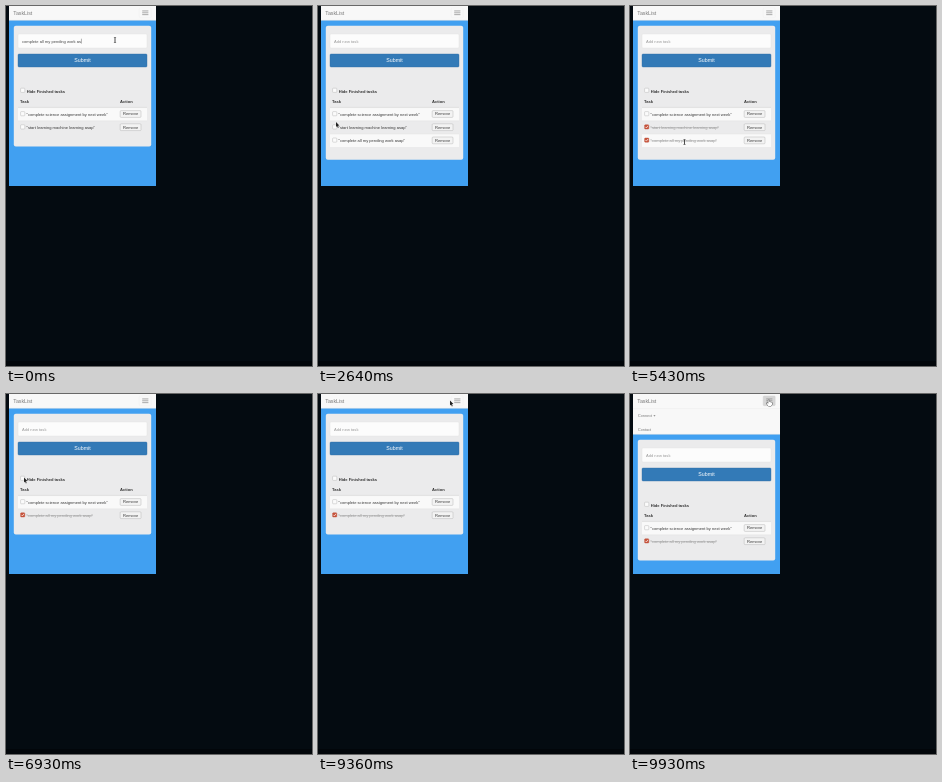
An HTML page with a canvas that plays this animation: 306 px wide and 360 px high, repeating every 10 s.

```html
<!DOCTYPE html>
<html>
<head>
<meta charset="utf-8">
<title>Task list</title>
<style>
html, body { margin: 0; width: 100%; height: 100%; overflow: hidden; background: #040b11; }
canvas { display: block; width: 306px; height: 360px; }
</style>
</head>
<body>
<canvas id="stage"></canvas>
<script>
const W = 306, H = 360, LOOP = 10000, FPS = 14, TEXT = 0.2907;
const canvas = document.getElementById('stage');
const ctx = canvas.getContext('2d');
const dpr = window.devicePixelRatio || 1;
canvas.width = W * dpr;
canvas.height = H * dpr;

const SCIENCE = 'complete science assignment by next week';
const LEARN = 'start learning machine learning asap';
const PENDING = 'complete all my pending work asap';

// time, x, y of the pointer's hot spot
const PATH = [
  [0, 109, 34], [1643, 109, 34], [1857, 101, 45], [2140, 82, 66],
  [2640, 18, 116], [2930, 18, 116], [3070, 17, 119.5], [3357, 17, 119.5],
  [3786, 52, 122], [4210, 24, 126], [4429, 17, 132.5], [4643, 17, 132.5],
  [5070, 54.5, 136], [5430, 54.5, 136], [5714, 120, 120], [5930, 121, 121],
  [6210, 121, 121], [6930, 18, 83.5], [8571, 18, 83.5],
  [9360, 132, 6.5], [9500, 139, 6], [10000, 139, 6]
];

const ease = k => k * k * (3 - 2 * k);

function pointerAt(t) {
  let i = 1;
  while (i < PATH.length - 1 && PATH[i][0] < t) i++;
  const [t0, x0, y0] = PATH[i - 1], [t1, x1, y1] = PATH[i];
  const k = ease(Math.min(1, Math.max(0, (t - t0) / (t1 - t0))));
  return [x0 + (x1 - x0) * k, y0 + (y1 - y0) * k];
}

function box(x, y, w, h, fill, r = 0, stroke) {
  ctx.beginPath();
  ctx.roundRect(x, y, w, h, r);
  ctx.fillStyle = fill;
  ctx.fill();
  if (stroke) {
    ctx.strokeStyle = stroke;
    ctx.lineWidth = 0.4;
    ctx.stroke();
  }
}

// size is in page pixels, scaled down like the rest of the page
function label(str, x, y, color = '#333', size = 14, weight = '', align = 'left') {
  ctx.save();
  ctx.translate(x, y);
  ctx.scale(TEXT, TEXT);
  ctx.font = `${weight} ${size}px "Liberation Sans", Arial, sans-serif`;
  ctx.textAlign = align;
  ctx.fillStyle = color;
  ctx.fillText(str, 0, 0);
  const w = ctx.measureText(str).width * TEXT;
  ctx.restore();
  return w;
}

function line(points, color, width) {
  ctx.beginPath();
  points.forEach(([x, y], i) => i ? ctx.lineTo(x, y) : ctx.moveTo(x, y));
  ctx.strokeStyle = color;
  ctx.lineWidth = width;
  ctx.stroke();
}

function checkbox(x, y, on) {
  box(x, y, 4.2, 4.2, on ? '#c9543c' : '#fbfbfb', 0.7, on ? '#b3462f' : '#aaa');
  if (on) line([[x + 0.9, y + 2.1], [x + 1.8, y + 3.1], [x + 3.4, y + 1]], '#fff', 0.7);
}

function polygon(points, fill, stroke) {
  ctx.beginPath();
  points.forEach(([x, y], i) => i ? ctx.lineTo(x, y) : ctx.moveTo(x, y));
  ctx.closePath();
  ctx.strokeStyle = stroke;
  ctx.lineWidth = 0.7;
  ctx.stroke();
  ctx.fillStyle = fill;
  ctx.fill();
}

function pointer(x, y, kind) {
  ctx.save();
  ctx.translate(x, y);
  if (kind === 'text') {
    line([[0, -2.4], [0, 2.4]], '#222', 0.8);
    line([[-1.1, -2.5], [1.1, -2.5]], '#222', 0.5);
    line([[-1.1, 2.5], [1.1, 2.5]], '#222', 0.5);
  } else if (kind === 'hand') {
    polygon([[-0.6, 0], [0.4, 0], [0.5, 2], [3, 2.6], [3, 4.4], [2.2, 6], [-0.7, 6],
      [-2.4, 3.6], [-1.8, 3], [-0.7, 3.8]], '#fff', '#222');
  } else {
    polygon([[0, 0], [0, 5], [1.1, 4], [1.9, 5.9], [2.7, 5.5], [1.9, 3.7], [3.4, 3.6]],
      '#222', '#f4f4f4');
  }
  ctx.restore();
}

function taskRow(task, i, hover) {
  const y = 108 + i * 13.2;
  if (i % 2 === 0) box(12, y - 6.3, 129, 13, '#f9f9f9');
  line([[12, y - 6.4], [141, y - 6.4]], '#dcdcdc', 0.35);
  checkbox(14.6, y - 2.4, task.done);
  const str = `"${task.name}"`, x = 20.5;
  const w = label(str, x, y + 1.6, task.done ? '#999' : '#333');
  if (task.done) line([[x, y + 0.4], [x + w, y + 0.4]], '#999', 0.4);
  box(114.2, y - 3.4, 20.8, 6.8, hover ? '#e0e0e0' : '#f3f3f3', 0.9, '#aaa');
  label('Remove', 124.6, y + 1.4, '#333', 14, '', 'center');
}

function stateAt(t) {
  const past = ms => t + 8 >= ms;
  const between = (a, b) => past(a) && !past(b);
  const hide = between(7290, 7710) || between(8430, 8571);
  let tasks = [{ name: SCIENCE, done: false }];
  if (!past(6210)) tasks.push({ name: LEARN, done: past(3210) });
  if (past(790)) tasks.push({ name: PENDING, done: past(4571) });
  if (hide) tasks = tasks.filter(task => !task.done);
  const typed = PENDING.length - (past(360) ? 0 : past(70) ? 1 : 2);
  return {
    tasks, hide,
    entry: past(790) ? '' : PENDING.slice(0, typed),
    pressed: past(9710),
    menu: 26 * ease(Math.min(1, Math.max(0, (t - 9640) / 280))),
    removing: between(5714, 6210)
  };
}

function pointerKind(x, y, t) {
  if (t > 9490) return 'hand';
  if (y > 28 && y < 42 && t < 2000) return 'text';
  return x > 23 && x < 100 && y > 117 && y < 140 && t > 3300 && t < 5700 ? 'text' : 'arrow';
}

function navbar(menu, pressed) {
  box(3, 0, 147, 14.3 + menu, '#f8f8f8');
  line([[3, 14.3 + menu], [150, 14.3 + menu]], '#dedede', 0.5);
  label('TaskList', 7.3, 8.7, '#777', 18);
  box(133.2, 1.9, 12, 9.8, pressed ? '#d5d5d5' : '#f8f8f8', 1, pressed ? '#ccc' : '#eee');
  for (let i = 0; i < 3; i++) box(136.2, 4.6 + i * 1.9, 6.2, 0.7, '#888');
  if (menu <= 0) return;
  ctx.save();
  ctx.beginPath();
  ctx.rect(3, 14.3, 147, menu);
  ctx.clip();
  line([[3, 14.6], [150, 14.6]], '#e4e4e4', 0.5);
  const w = label('Connect', 8, 23.2, '#777', 13);
  polygon([[9.3 + w, 21.2], [11.5 + w, 21.2], [10.4 + w, 22.4]], '#777', 'transparent');
  label('Contact', 8, 36.5, '#777', 13);
  ctx.restore();
}

function panel(s) {
  const rows = s.tasks.length;
  box(7.8, 19.8, 137.4, 107.6 + (rows - 1) * 13.2, '#ebebec', 2);
  box(12, 28, 129, 14, '#fcfcfc', 1, '#ddd');
  if (s.entry) {
    const w = label(s.entry, 16, 36.6, '#444');
    line([[16.4 + w, 32.7], [16.4 + w, 37.6]], '#444', 0.4);
  } else {
    label('Add new task', 16, 36.6, '#999');
  }
  box(12, 48, 129, 13, '#337ab7', 1, '#2e6da4');
  label('Submit', 76.5, 56.3, '#fff', 18, '', 'center');
  checkbox(14.6, 82.2, s.hide);
  label('Hide Finished tasks', 20.7, 86.6, '#333', 14, 'bold');
  label('Task', 14, 97.4, '#333', 14, 'bold');
  label('Action', 114, 97.4, '#333', 14, 'bold');
  line([[12, 101.4], [141, 101.4]], '#d4d4d4', 0.6);
  s.tasks.forEach((task, i) => taskRow(task, i, s.removing && i === 1));
}

function draw(t) {
  const s = stateAt(t);
  ctx.setTransform(dpr, 0, 0, dpr, 0, 0);
  box(0, 0, W, H, '#040b11');
  box(0, 355, W, 5, '#02060a');
  ctx.save();
  ctx.beginPath();
  ctx.rect(3, 0, 147, 180);
  ctx.clip();
  box(3, 0, 147, 180, '#41a0f1');
  ctx.save();
  ctx.translate(0, s.menu);
  panel(s);
  ctx.restore();
  navbar(s.menu, s.pressed);
  const [x, y] = pointerAt(t);
  pointer(x, y, pointerKind(x, y, t));
  ctx.restore();
}

const start = performance.now();
function tick() {
  const t = (performance.now() - start) % LOOP;
  draw(Math.floor((t + 5) * FPS / 1000) * 1000 / FPS % LOOP);
  requestAnimationFrame(tick);
}
tick();
</script>
</body>
</html>
```
